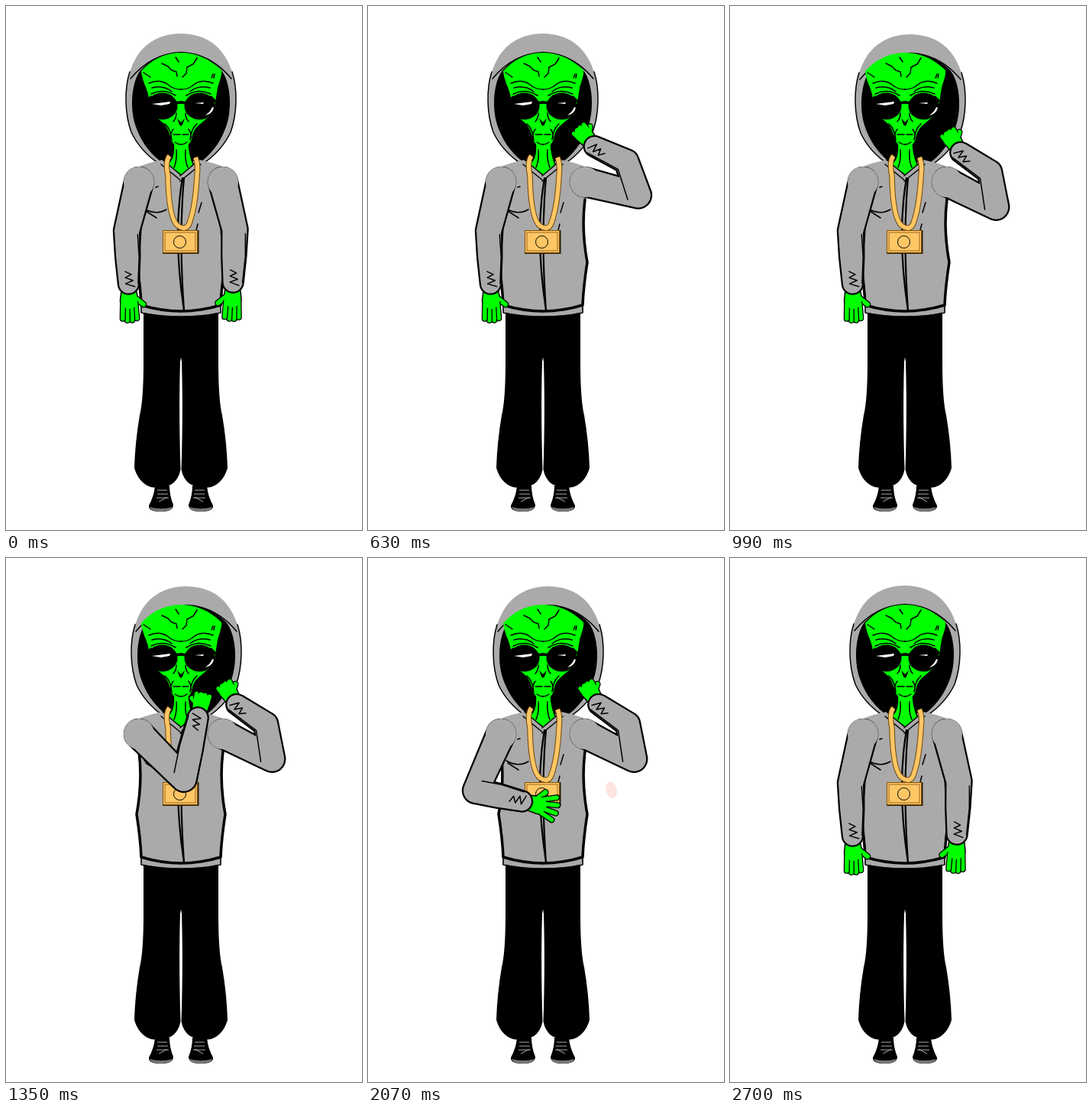
These frames come from a looping animation (466 by 685 pixels, 2.79 s). An HTML page:

```html
<!DOCTYPE html>
<html lang="en">
<head>
<meta charset="utf-8">
<title>Hooded alien</title>
<style>
  html, body { margin: 0; width: 100%; height: 100%; overflow: hidden; background: #fff; }
  svg { display: block; width: 100vw; height: 100vh; }
  .mirror { transform: translateX(458px) scaleX(-1); }
  .gray { fill: #aaa; }
  .green { fill: #0f0; }
  .gold { fill: #ffc665; }
  .line { fill: none; stroke: #000; stroke-width: 1.5; stroke-linecap: round; stroke-linejoin: round; }
  .thick { stroke-width: 3.5; }
  .lace { fill: none; stroke: #aaa; }
  .chain { fill: none; stroke: #ffc665; stroke-width: 5.5; }
  .rim { stroke: #6b470c; stroke-width: 7.5; }
</style>
</head>
<body>
<svg viewBox="0 0 466 685">
  <!-- trousers and shoes -->
  <g id="leg">
    <path d="M195 627L214 627Q214 640 219 652Q219 661 203 661Q186 661 187 653Q194 640 195 627Z"/>
    <path d="M188 655Q203 659 218 655Q216 661 203 661Q190 661 188 655Z" fill="#777"/>
    <path class="lace" d="M198 633H211M198 638H212M197 643H213M200 648L211 642"/>
    <path d="M180 398L180 465Q180 515 175 535Q169 570 168 604Q174 624 190 629Q206 631 217 625Q226 619 228.500 606Q226 530 228 465L229.500 456V398Z"/>
  </g>
  <use href="#leg" class="mirror"/>

  <g id="hood">
    <g id="hoodHalf">
      <path class="gray" d="M230 36C202 36 180 48 168 72C154 98 155 140 164 165C172 182 184 195 200 207H230Z"/>
      <path d="M230 61C208 61 190 69 176 84C164 100 162 133 169 155C175 173 185 190 202 203H230Z"/>
      <path class="line" stroke-width="2" d="M162 86C155 108 155 140 164 165C172 182 184 195 200 206"/>
      <path class="line" d="M230 60.500C207 61 183 71 163 95"/>
    </g>
    <use href="#hoodHalf" class="mirror"/>
  </g>

  <!-- neck and face -->
  <path class="green line" style="fill:#0f0" d="M219 177Q221 195 215 203L209 207L231 222L246 209Q240 197 239 177Z"/>
  <path class="green" d="M177 85C191 70 207 62 227 61C249 61 267 69 282 84C283 91 279 99 277 107Q275 124 270 141Q260 149 250 158Q244 164 243 174Q240 184 230 185Q220 185 216 174Q213 161 207 154Q198 146 190 142Q188 118 183 106Q178 95 177 85Z"/>
  <g id="faceHalf">
    <path class="line" d="M187 101Q203 94 215 105Q221 109 229 109M191 107Q206 103 217 112M190 115Q206 107 222 117M208 154Q216 161 217 175M219 161Q215 166 216 173M223 140Q223 147 219 151M221 178Q225 181 229 181M223 188Q224 202 220 211"/>
    <path d="M224 147L229 152V157L227 155Z"/>
    <ellipse cx="204.500" cy="131" rx="20" ry="17.500"/>
    <path class="line thick" d="M219 128Q223 126 230 126M185 124L190 119"/>
  </g>
  <use href="#faceHalf" class="mirror"/>
  <path class="line" d="M204 75L212 79L217 84L223 86L224 92M222 67L226 73M250 68L245 76L237 80L236 88L231 93M180 87L189 93M269 94L271 89M272 94L273 89M219 168H228M231 168H239"/>
  <path d="M191 128L215 125L214 128L203 130ZM247 127L259 126L258 128ZM272 133Q270 141 261 143Q268 138 270 132Z" fill="#fff"/>

  <!-- hoodie -->
  <g id="bodyHalf">
    <path class="gray" d="M230 222L205 201Q190 204 176 209Q171 230 174 255Q179 292 171 335Q176 370 176 400Q200 406 230 406Z"/>
    <path class="line thick" d="M174 253Q179 292 171 335Q176 367 177 391Q203 399 230 399"/>
    <path class="line" d="M177 392V401Q200 406 230 406M205 201L230 222M203 207L230 229" stroke-width="2"/>
  </g>
  <use href="#bodyHalf" class="mirror"/>
  <path class="line" d="M181 265Q196 274 210 266M183 268L197 277M256 257L252 270M251 285L249 293M196 237L199 236"/>
  <path class="line" style="stroke-width:2.200" d="M231 225Q218 300 233 398Q226 300 233 225"/>

  <!-- chain and pendant -->
  <g id="chain">
    <path id="loop" class="chain rim" d="M214 196Q208 203 212 222Q213 280 226 288Q236 294 240 284Q248 262 250 222Q252 207 248 198"/>
    <path class="chain" d="M214 196Q208 203 212 222Q213 280 226 288Q236 294 240 284Q248 262 250 222Q252 207 248 198"/>
  </g>
  <rect x="205" y="293" width="47.500" height="31" fill="#2a1b05"/>
  <rect class="gold" x="205.500" y="293.500" width="45" height="29" stroke="#80520c"/>
  <rect x="208" y="296" width="40" height="24" fill="none" stroke="#80520c" stroke-width=".8"/>
  <circle class="gold" cx="227.500" cy="308.500" r="8" stroke="#000"/>

  <g id="right"></g>
  <ellipse id="charm" rx="7" ry="11" fill="#ffe4e2"/>
  <g id="left"></g>
</svg>

<script>
const LOOP = 2790, STEP = 90;
const $ = id => document.getElementById(id);
const mix = (a, b, u) => a + (b - a) * u;
const polar = ([x, y], deg, r) => {
  const a = deg * Math.PI / 180;
  return [x + r * Math.cos(a), y + r * Math.sin(a)];
};
const bar = (d, color, width) =>
  `<path d="${d}" fill="none" stroke="${color}" stroke-width="${width}" stroke-linecap="round" stroke-linejoin="round"/>`;

// Bone angles in degrees; bow bends the forearm, reach and fan shape the fingers
const pose = (upper, upperLen, fore, foreLen, bow, reach, fan) =>
  ({ upper, upperLen, fore, foreLen, bow, reach, fan });

const rightDown = pose(76, 64, 92, 69, 0, 23, 2);
const rightHigh = pose(14, 72, 228, 86, 18, 5, 3);
const rightEar = pose(27, 72, 237, 85, 18, 5, 3);
const leftDown = pose(104, 66, 88, 69, 0, 23, 2);
const leftFace = pose(45, 83, -77, 82, 0, 5, 3);
const leftPull = pose(45, 83, -83, 74, 0, 5, 3);
const leftBelly = pose(114, 81, 13, 62, 0, 22, 14);

const arms = {
  right: {
    shoulder: [284, 230], side: 1,
    keys: [[270, rightDown], [630, rightHigh], [900, rightEar], [2430, rightEar], [2700, rightDown]]
  },
  left: {
    shoulder: [174, 230], side: -1,
    keys: [[990, leftDown], [1350, leftFace], [1530, leftFace], [1800, leftPull], [1890, leftBelly], [2430, leftBelly], [2700, leftDown]]
  }
};

function poseAt(keys, t) {
  const i = keys.findIndex(k => k[0] > t);
  if (i < 1) return keys[i < 0 ? keys.length - 1 : 0][1];
  const [t0, a] = keys[i - 1], [t1, b] = keys[i];
  const out = {};
  for (const k in a) out[k] = mix(a[k], b[k], (t - t0) / (t1 - t0));
  return out;
}

// Outline around two circles
function taper(a, b, ra, rb) {
  const dir = Math.atan2(b[1] - a[1], b[0] - a[0]) * 180 / Math.PI;
  return `M${polar(a, dir + 90, ra)}A${ra} ${ra} 0 0 1 ${polar(a, dir - 90, ra)}` +
    `L${polar(b, dir - 90, rb)}A${rb} ${rb} 0 0 1 ${polar(b, dir + 90, rb)}Z`;
}

function drawHand(wrist, dir, side, reach, fan) {
  const palm = taper(polar(wrist, dir, 8), polar(wrist, dir, 22), 9, 11);
  const finger = (from, deg, len, w) => {
    const d = `M${from}L${polar(from, deg, len)}`;
    return bar(d, '#000', w + 2.6) + bar(d, '#0f0', w);
  };
  let out = `<path d="${palm}" stroke="#000" stroke-width="3"/>`;
  out += finger(polar(wrist, dir + side * 25, 22), dir + side * 50, 3 + reach * .4, 6);
  for (let i = -1.5; i < 2; i++) {
    const root = polar(polar(wrist, dir, 26), dir + 90, i * 5.5);
    out += finger(root, dir + i * fan, reach * (1 - Math.abs(i) * .1), 5.5);
  }
  return out + `<path class="green" d="${palm}"/>`;
}

function drawArm({ shoulder, side, keys }, t) {
  const p = poseAt(keys, t);
  const elbow = polar(shoulder, p.upper, p.upperLen);
  const wrist = polar(elbow, p.fore, p.foreLen);
  const middle = polar(polar(elbow, p.fore, p.foreLen / 2), p.fore + 90, p.bow);
  const sleeve = taper(shoulder, elbow, 18, 16) + taper(elbow, middle, 16, 15) + taper(middle, wrist, 15, 12.5);

  // Zigzag folds near the cuff, and the inner edge of the forearm
  let folds = 'M';
  for (let i = 0; i < 6; i++) {
    folds += `${i ? 'L' : ''}${polar(polar(wrist, p.fore, 4 - i * 4), p.fore + 90, i % 2 ? 4 : -8 + i)}`;
  }
  const inner = [polar(elbow, p.fore - 70, 15), polar(middle, p.fore - 90, 15), polar(wrist, p.fore - 90, 12.5)];
  return drawHand(wrist, p.fore, side, p.reach, p.fan) +
    `<path d="${sleeve}" stroke="#000" stroke-width="4.500"/><path class="gray" d="${sleeve}"/>` +
    `<circle class="gray" cx="${shoulder[0]}" cy="${shoulder[1]}" r="20"/>` +
    `<path class="line" d="M${inner.join('L')}"/><path class="line" d="${folds}"/>`;
}

// The charm is drawn from the hood, carried down, then tossed back
function moveCharm(t) {
  const shown = t >= 1620 && t < 2430;
  $('charm').style.display = shown ? '' : 'none';
  const u = Math.max(0, (t - 1890) / 540), v = 1 - u;
  const toss = (a, b, c) => v * v * a + 2 * u * v * b + u * u * c;
  const [x, y] = t < 1890 ? [260, 163] : [toss(246, 400, 284), toss(350, 290, 170)];
  $('charm').setAttribute('transform', `translate(${x} ${y}) rotate(-15)`);
}

let last = -1;
function frame(now) {
  const t = Math.floor(now % LOOP / STEP) * STEP;
  if (t !== last) {
    last = t;
    const shift = Math.max(0, Math.min(1, (t - 630) / 270, (2700 - t) / 270));
    $('hood').setAttribute('transform', `translate(${7 * shift} ${shift})`);
    for (const id in arms) $(id).innerHTML = drawArm(arms[id], t);
    moveCharm(t);
  }
  requestAnimationFrame(frame);
}
frame(performance.now());
</script>
</body>
</html>
```
